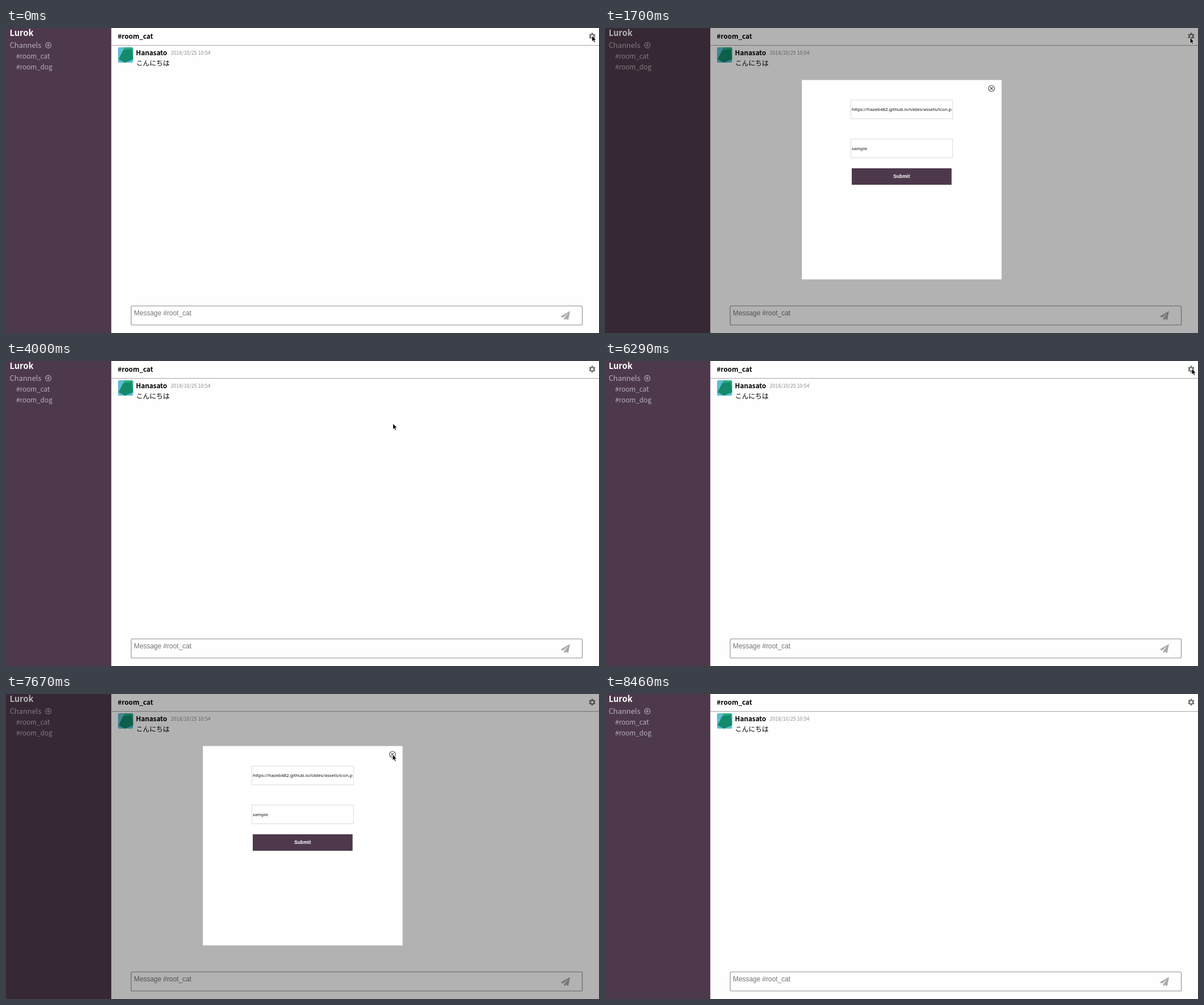
Animation, 1043 px wide and 537 px high, one loop 8900 ms. Source, as an HTML page:

```html
<!DOCTYPE html>
<html lang="ja">
<head>
<meta charset="utf-8">
<title>Chat room</title>
<style>
html, body { margin: 0; width: 100%; height: 100%; overflow: hidden; background: #fefefe; }
svg { display: block; width: 1043px; height: 537px; }
text { font-family: "Noto Sans CJK JP", "Noto Sans CJK", sans-serif; font-size: 11.72px; white-space: pre; }
.bold { font-weight: 700; }
.brand { font-size: 14.65px; fill: #fff; }
.side { fill: #b8b0b7; }
.head { font-size: 12.9px; }
.time { font-size: 8.79px; fill: #8c8c8c; }
.field { font-family: "Noto Sans", sans-serif; font-size: 7.97px; fill: #111; }
.plain { font-family: "Liberation Sans", Arial, sans-serif; }
.hint { font-size: 11.9px; fill: #757575; }
.submit { font-size: 8.7px; fill: #fff; text-anchor: middle; }
</style>
</head>
<body>
<svg viewBox="0 0 1043 537">
  <defs>
    <clipPath id="face"><rect x="197" y="34" width="26.5" height="27" rx="2.5"/></clipPath>
    <clipPath id="urlBox"><rect x="433" y="127" width="177" height="33"/></clipPath>
  </defs>

  <rect width="1043" height="537" fill="#fefefe"/>
  <rect width="185.2" height="537" fill="#4d394b"/>
  <text class="brand bold" x="6.4" y="14">Lurok</text>
  <text class="side head" x="6.4" y="35">Channels</text>
  <g fill="none" stroke="#b8b0b7" stroke-width="1.1">
    <circle cx="74.4" cy="30.3" r="4.9"/>
    <path d="M71.4 30.3h6m-3-3v6"/>
  </g>
  <text class="side" x="18" y="54.2">#room_cat</text>
  <text class="side" x="18" y="72.6">#room_dog</text>

  <text class="bold" x="196.6" y="19">#room_cat</text>
  <rect x="185.2" y="30" width="858" height="1.2" fill="#b0b0b0"/>
  <path id="gear" fill="#757575" fill-rule="evenodd"/>

  <g clip-path="url(#face)">
    <rect x="197" y="34" width="27" height="27" fill="#5fbdd2"/>
    <path d="M208 34h16v19h-20z" fill="#2dac85"/>
    <path d="M206 39l15-2 3 18-15 6-11-6z" fill="#138a6b"/>
  </g>
  <text class="bold" x="228.6" y="48">Hanasato</text>
  <text class="time" x="289.8" y="47.1">2018/10/25 10:54</text>
  <text x="229" y="66.3">こんにちは</text>

  <rect x="220.2" y="489.4" width="793.4" height="33.5" rx="2" fill="none" stroke="#a3a3a3" stroke-width="1.4"/>
  <text class="plain hint" x="225" y="505.8">Message #root_cat</text>
  <path d="M992 498.300L975.500 507.800l4.300 1.900 9.500-8.200-7.500 9.300v4.200l2.500-3.100 4.700 2z" fill="#a9a9a9"/>

  <g id="modal">
    <rect width="1043" height="537" opacity=".3"/>
    <rect x="346.3" y="91.6" width="351.2" height="351" fill="#fff"/>
    <g fill="none" stroke="#444" stroke-width="1.1">
      <circle cx="679.8" cy="106.4" r="5.4"/>
      <path d="M677.4 104l4.8 4.8m0-4.8l-4.8 4.8"/>
    </g>
    <g fill="#fff" stroke="#d9d9d9">
      <rect x="432.3" y="126.8" width="179" height="33"/>
      <rect x="432.3" y="195.5" width="179" height="33"/>
    </g>
    <text class="field" x="434" y="146.1" clip-path="url(#urlBox)">https://hazeb482.github.io/slides/assets/icon.p</text>
    <text class="field" x="434" y="214.9">sample</text>
    <rect x="434" y="247" width="175.6" height="29" fill="#4d394b"/>
    <text class="plain bold submit" x="521.7" y="264.3">Submit</text>
  </g>

  <path id="arrow" d="M0 0v10.600l2.400-2.300 1.600 3.800 1.900-.8-1.600-3.700h3.200z" stroke="#fff" stroke-width=".8"/>
  <path id="hand" d="M-1 6V1.500q1-2 2.200 0v4q2-1 2.600.3 2-.6 2.400.7 1.800 0 1.800 1.500t-1 4.500v1.200H.8v-1.200l-3.400-4q-.3-2 1.600-.7z" fill="#fff" stroke="#000" stroke-width=".9" stroke-linejoin="round"/>
</svg>
<script>
const LOOP = 8900, STEP = 155;
const el = id => document.getElementById(id);
const modal = el('modal'), arrow = el('arrow'), hand = el('hand');

function gearPath(cx, cy, size) {
  const teeth = 6, n = teeth * 4, points = [];
  for (let i = 0; i < n; i++) {
    const r = i % 4 < 2 ? size : size * .74;
    const a = (i - .5) / n * 2 * Math.PI - Math.PI / 2;
    points.push(`${cx + r * Math.cos(a)} ${cy + r * Math.sin(a)}`);
  }
  const h = size * .36;
  return `M${points.join('L')}ZM${cx - h} ${cy}a${h} ${h} 0 1 0 ${2 * h} 0a${h} ${h} 0 1 0 ${-2 * h} 0Z`;
}
el('gear').setAttribute('d', gearPath(1031, 14.4, 6.1));

// The pointer goes from stop to stop; dip bows the path downwards.
const home = { x: 1030.5, y: 13.5 };
const moves = [
  { from: 440, until: 650, x: 1029, y: 17, dip: 0 },
  { from: 2450, until: 3400, x: 680.5, y: 110, dip: 82 },
  { from: 4300, until: 5260, x: 1034, y: 14, dip: 38 },
  { from: 5850, until: 6290, x: 1032, y: 13.5, dip: 0 },
  { from: 6440, until: 6790, x: 815, y: 155, dip: 0 },
  { from: 6940, until: 7380, x: 680, y: 106.5, dip: 10 },
  { from: 7820, until: 8460, x: 790, y: -20, dip: 0 }
];
const pointing = t => t >= 650 && t < 1700 || t >= 3550 && t < 4000 || t >= 7380 && t < 7670;
const modalOpen = t => t >= 1550 && t < 4000 || t >= 6440 && t < 7820;

const ease = u => u * u * (3 - 2 * u);

function pointerAt(t) {
  let { x, y } = home;
  for (const m of moves) {
    if (t < m.from) break;
    const held = Math.floor((t - m.from) / STEP) * STEP + STEP;
    const u = t >= m.until ? 1 : ease(Math.min(1, held / (m.until - m.from + STEP)));
    x += (m.x - x) * u;
    y += (m.y - y) * u + m.dip * 4 * u * (1 - u);
  }
  return [x, y];
}

const show = (node, on) => node.setAttribute('visibility', on ? 'visible' : 'hidden');

function draw(t) {
  const [x, y] = pointerAt(t), onLink = pointing(t);
  show(modal, modalOpen(t));
  show(hand, onLink);
  show(arrow, !onLink);
  (onLink ? hand : arrow).setAttribute('transform', `translate(${x} ${y})`);
}

const begin = performance.now();
function tick() {
  draw((performance.now() - begin) % LOOP);
  requestAnimationFrame(tick);
}
tick();
</script>
</body>
</html>
```
